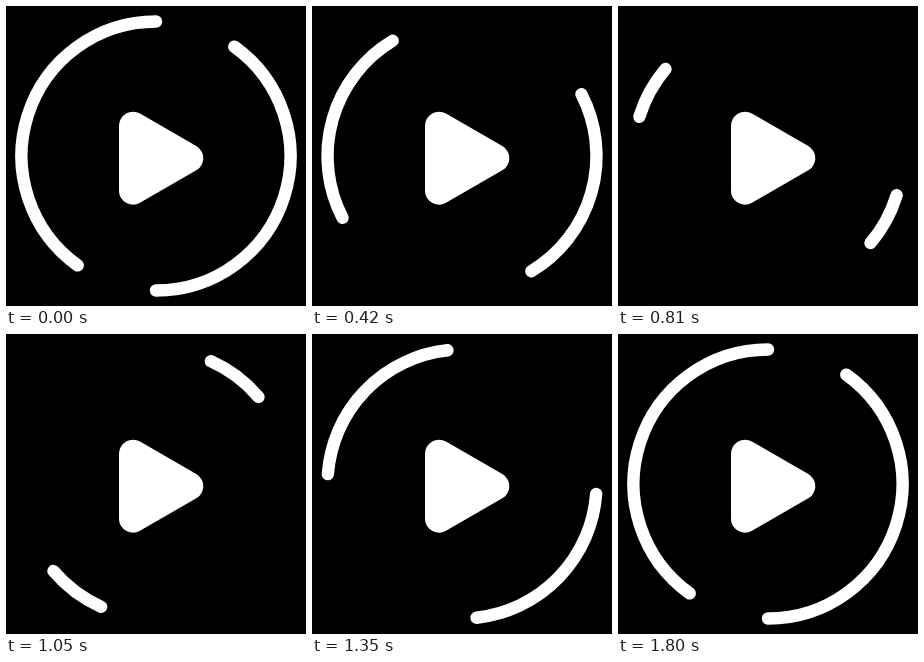
An HTML page that plays this animation: 300x300 px, repeating every 1830 ms.

```html
<!DOCTYPE html>
<html lang="en">
<head>
<meta charset="utf-8">
<title>Play button loader</title>
<style>
  html, body { margin: 0; width: 100%; height: 100%; overflow: hidden; background: #000; }
  svg { display: block; width: 100%; height: 100%; }
  path { fill: none; stroke: #fff; stroke-width: 12.4; stroke-linecap: round; }
  polygon { fill: #fff; stroke: #fff; stroke-width: 28; stroke-linejoin: round; }
</style>
</head>
<body>
<svg viewBox="0 0 300 300">
  <path id="arcA"/>
  <path id="arcB"/>
  <polygon points="127,119.7 127,184.7 183.3,152.2"/>
</svg>
<script>
const LOOP = 1830, TICK = 30, REST = 2, STEPS = 58;
const CENTER = 150, RADIUS = 134.5;
const FULL = 144.4, SHORT = 4;
const arcs = [document.getElementById('arcA'), document.getElementById('arcB')];

const clamp = (v, lo, hi) => Math.min(hi, Math.max(lo, v));
const mix = (a, b, p) => a + (b - a) * clamp(p, 0, 1);

function point(deg) {
  const a = deg * Math.PI / 180;
  return (CENTER + RADIUS * Math.cos(a)).toFixed(3) + ' ' +
         (CENTER + RADIUS * Math.sin(a)).toFixed(3);
}

// The arc shrinks during the first half, then regrows and is full just before the end.
function spanAt(step) {
  const half = STEPS / 2;
  return step < half ? mix(FULL, SHORT, step / half)
                     : mix(SHORT, FULL, (step - half) / 26);
}

function render(ms) {
  const step = clamp(Math.floor((ms % LOOP) / TICK) - REST, 0, STEPS);
  const head = 90 + 720 * step / STEPS;
  const tail = head - spanAt(step);
  arcs.forEach((arc, i) => {
    const turn = i * 180;
    arc.setAttribute('d',
      `M${point(tail + turn)}A${RADIUS} ${RADIUS} 0 0 1 ${point(head + turn)}`);
  });
}

const start = performance.now();
function loop() {
  render(performance.now() - start);
  requestAnimationFrame(loop);
}
loop();
</script>
</body>
</html>
```
